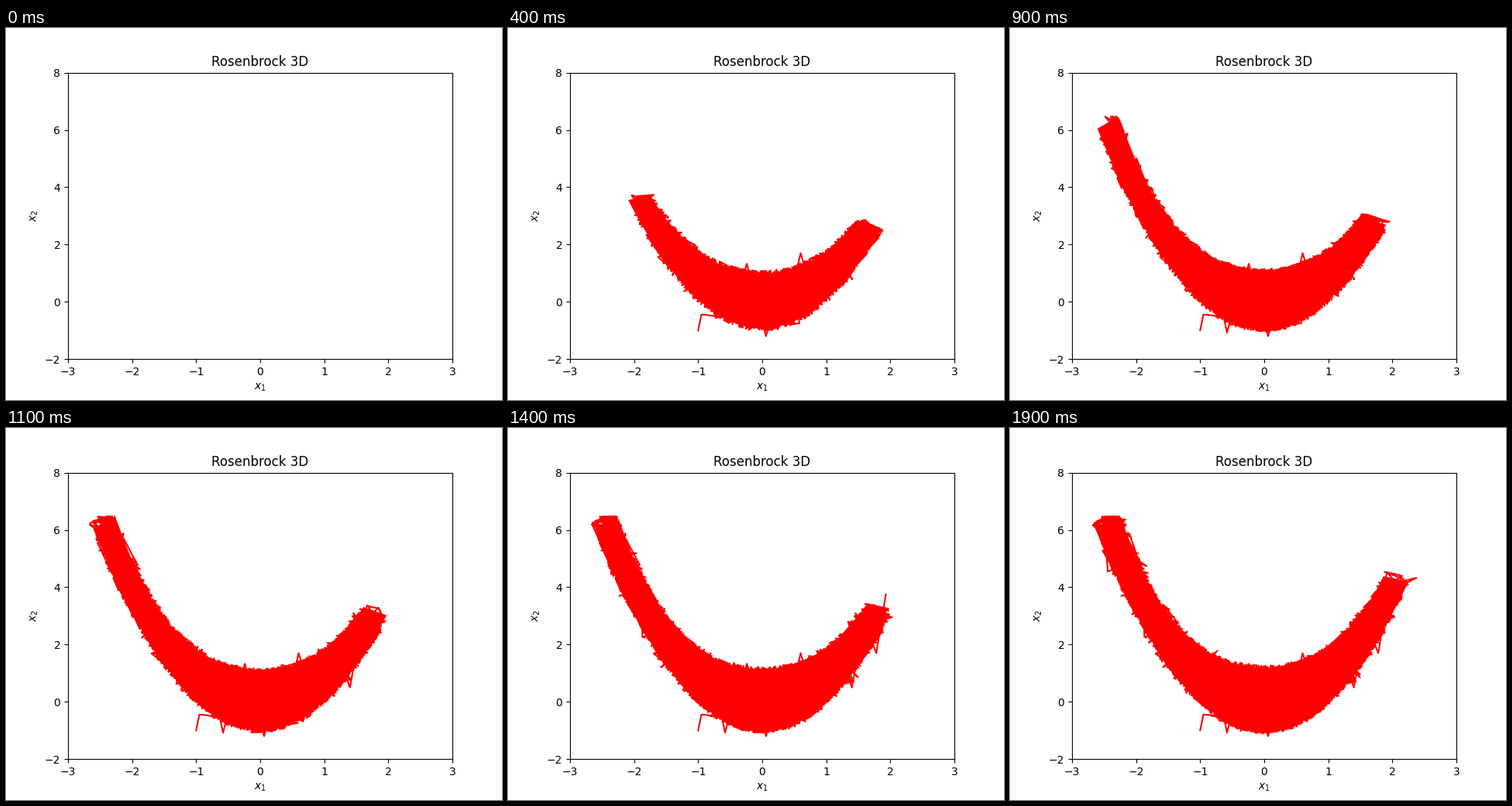
Write a matplotlib script that moves like this. It is 640x480 px and loops after 2000 ms.

```python
import numpy as np
import matplotlib.pyplot as plt
from matplotlib.animation import FuncAnimation

FRAMES, STEP_MS, PER_FRAME = 20, 100, 520
plt.rcParams["agg.path.chunksize"] = 1000

# Peaks of lone excursions of the chain: first frame, x, y.
PEAKS = [(1, 0.06, -1.2), (1, -0.24, 1.33), (1, 0.6, 1.7),
         (7, -0.58, -1.08), (10, 1.4, 0.5), (13, 1.78, 1.7)]


def lower(x):
    return -1.12 + 1.03 * x**2


def upper(x):
    return 1.28 + 0.6 * x**2 + 0.092 * x**4


def tips(k):
    """Ends of the explored stretch, as x on the lower edge."""
    left = np.interp(k, [1, 2, 6, 9], [-1.75, -1.93, -2.38, -2.66])
    right = np.interp(k, [2, 9, 11, 14, 19], [1.87, 1.94, 2.03, 2.04, 2.3])
    return left, right


def margins(k):
    """Width fractions of the band that has been visited so far."""
    rest = 1 - k / (FRAMES - 1)
    return 0.05 * rest, 1 - 0.1 * rest


def band(u, w, k):
    """Points between the edges, cut flat a little above each tip."""
    left, right = tips(k)
    inner = u * (0.7 + 0.022 * u**2)
    y = lower(u) + w * (upper(inner) - lower(u))
    top = lower(np.where(u < 0, left, right)) + 0.3
    return np.column_stack([u + w * (inner - u), np.minimum(y, top)])


def sweep(k):
    """Samples added during one frame, running along the crescent."""
    rng = np.random.default_rng(40 + k)
    left, right = tips(k)
    lo, hi = margins(k)
    u = np.linspace(left, right, PER_FRAME) + rng.normal(0, 0.06, PER_FRAME)
    w = lo + (hi - lo) * rng.beta(0.6, 0.6, PER_FRAME)
    pts = band(np.clip(u, left, right), w, k)
    pts[:, 0] += rng.laplace(0, 0.02, PER_FRAME)
    return pts if k % 2 else pts[::-1]


def core(k):
    left, right = tips(k)
    lo, hi = margins(k)
    u = np.linspace(left + 0.03, right - 0.03, 120)
    return np.vstack([band(u, lo + 0.04, k), band(u, hi - 0.04, k)[::-1]])


def excursion(x, y):
    """A narrow corner from the middle of the band out to a peak."""
    xs = np.array([x - 0.15, x, x + 0.15])
    ys = (lower(xs) + upper(xs)) / 2
    ys[1] = y
    return xs, ys


chain = np.vstack([sweep(k) for k in range(1, FRAMES)])

fig, ax = plt.subplots(figsize=(6.4, 4.8), dpi=100)
ax.set(xlim=(-3, 3), ylim=(-2, 8), title="Rosenbrock 3D",
       xlabel="$x_1$", ylabel="$x_2$")
body, = ax.fill([0], [0], color="r", lw=0, zorder=1.9)
trace, = ax.plot([], [], "r-", lw=1.5)
start, = ax.plot([-1, -0.95, -0.9, -0.6], [-1, -0.45, -0.45, -0.55],
                 "r-", lw=1.5)
extras = [(1, start)]
extras += [(first, ax.plot(*excursion(x, y), "r-", lw=1.5)[0])
           for first, x, y in PEAKS]


def draw(k):
    trace.set_data(*chain[:k * PER_FRAME].T)
    body.set_visible(k > 0)
    if k:
        body.set_xy(core(k))
    for first, line in extras:
        line.set_visible(k >= first)
    return [body, trace] + [line for _, line in extras]


def reset():
    return draw(0)


anim = FuncAnimation(fig, draw, frames=FRAMES, init_func=reset,
                     interval=STEP_MS, repeat=True, repeat_delay=0)
plt.show()
```
